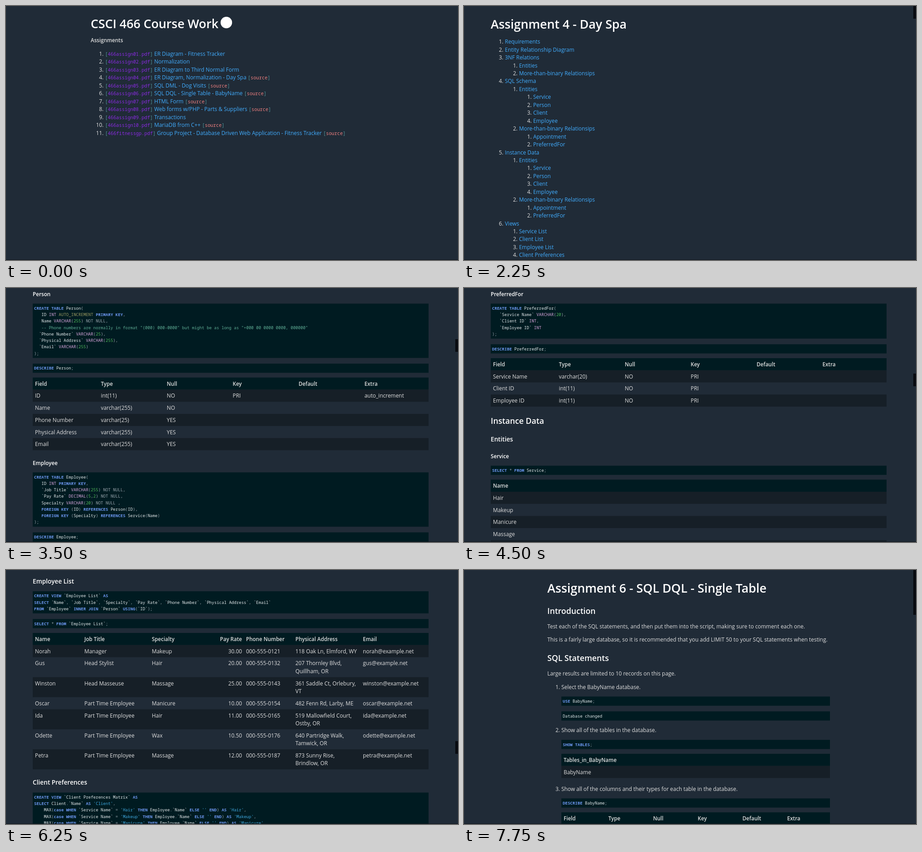
Animation, 998 px wide and 561 px high, one loop 8000 ms. Source, as an HTML page:

```html
<!DOCTYPE html>
<html lang="en">
<head>
<meta charset="utf-8">
<title>Course work</title>
<style>
html, body { margin: 0; width: 100%; height: 100%; overflow: hidden; background: #202b37; }
svg { display: block; width: 100vw; height: 100vh; }
text { font: 11.9px "Open Sans", "Noto Sans", sans-serif; fill: #dfdfdf; white-space: pre; }
.h1, .h2, .h3, .h4 { font-weight: 600; fill: #fff; }
.h1 { font-size: 26.8px; }
.h2 { font-size: 17.7px; }
.h3 { font-size: 13.7px; }
.h4 { font-size: 11.7px; }
.b { font-weight: 600; font-size: 11.6px; }
.a { fill: #41adff; }
.mono { font: 500 10.37px "Noto Sans Mono", monospace; fill: #4f9499; }
.pdf { fill: #8a2be2; }
.src { fill: #f08080; }
.code { font: 500 9.09px "Noto Sans Mono", monospace; fill: #e4e8ea; }
.com { fill: #5fae96; }
.str { fill: #3fa9e0; }
.kw { fill: #6c96ee; font-weight: 600; }
.type { fill: #d9a5dc; }
.auto { fill: #9b9a62; }
.num { fill: #4fb85a; }
.op { fill: #9aa5ad; }
.ink { font-family: Lato, sans-serif; text-anchor: middle; }
</style>
</head>
<body>
<svg id="stage" viewBox="0 0 998 561"></svg>
<script>
const PURPLE = '#5a2a91', BLUE = '#0e6dbd', DARK = '#001b21', ROW = '#161f27';
const LEFT = 59, RIGHT = 933, LINE = 17.45, ROW_H = 26.75, CODE_H = 14.25;
const SIZE = { h1: 26.8, h2: 17.7, h3: 13.7, h4: 11.7, code: 9.09 };

let out = '', y = 0, afterHead = false, marks = [];

// Text is placed by the middle of its capitals.
const text = (x, cy, s, cls = '', anchor = 'start') =>
  out += `<text x="${x}" y="${cy + 0.357 * (SIZE[cls] || 11.9)}" class="${cls}" text-anchor="${anchor}">${s}</text>`;
const rect = (x, top, w, h, fill) =>
  out += `<rect x="${x}" y="${top}" width="${w}" height="${h}" fill="${fill}"/>`;
const span = (cls, s) => `<tspan class="${cls}">${s}</tspan>`;

function page(draw) {
  out = '';
  draw();
  return out;
}

// ---- flowing parts: each one moves the cursor y ----
const HEADS = { h2: [32, 24, 25], h3: [29.3, 22, 25], h4: [28.5, 20.5, 14] };

function head(cls, s) {
  const [before, after, top] = HEADS[cls];
  y += afterHead ? 16 : before;
  text(LEFT, y, s, cls);
  marks.push(y - top);
  y += after;
  afterHead = true;
}

const TOKENS = /(--.*)|(`[^`]*`)|('[^']*')|\b(CREATE|TABLES?|VIEW|PRIMARY|FOREIGN|KEY|REFERENCES|DESCRIBE|SELECT|FROM|INNER|JOIN|USING|USE|SHOW|AS|GROUP BY|case|WHEN|THEN|ELSE|END)\b|\b(INT|VARCHAR|DECIMAL|DATETIME)\b|(AUTO_INCREMENT)|\b(\d+)\b|(NOT NULL|[*=(),;.])/g;
const KINDS = ['com', '', 'str', 'kw', 'type', 'auto', 'num', 'op'];
const paint = s => s.replace(TOKENS, (m, ...g) => span(KINDS[g.findIndex(v => v !== undefined)], m));

function code(src, x0 = LEFT, x1 = RIGHT) {
  const lines = src.split('\n'), h = lines.length * CODE_H + 6;
  rect(x0, y, x1 - x0, h, DARK);
  lines.forEach((s, i) => text(x0 + 3, y + 10.1 + i * CODE_H, paint(s), 'code'));
  y += h + 12.5;
  afterHead = false;
}

// A negative column is the right edge of right-aligned cells; "|" breaks a line.
function table(cols, rows, x0 = LEFT, x1 = RIGHT) {
  y -= 2;
  rows.forEach((row, i) => {
    const cells = row.map(c => String(c).split('|'));
    const h = ROW_H + LINE * (Math.max(...cells.map(c => c.length)) - 1);
    if (!i || i % 2) rect(x0, y, x1 - x0, h, i ? ROW : DARK);
    cells.forEach((c, k) => c.forEach((s, n) =>
      text(Math.abs(cols[k]), y + 13.7 + n * LINE, s, i ? '' : 'b', cols[k] < 0 ? 'end' : 'start')));
    y += h;
  });
  afterHead = false;
}

const DESC = ['Field', 'Type', 'Null', 'Key', 'Default', 'Extra'];
const descCols = (x, step) => DESC.map((_, i) => x + i * step);

function schema(name, body, rows) {
  head('h4', name);
  code(`CREATE TABLE ${name}(\n${body}\n);`);
  code(`DESCRIBE ${name};`);
  table(descCols(64, 145.5), [DESC, ...rows]);
}

function data(name, cols, rows) {
  head('h4', name);
  code(`SELECT * FROM ${name};`);
  table(cols, rows);
}

function view(name, body, cols, rows) {
  head('h3', name);
  code(`CREATE VIEW \`${name}\` AS\n${body}`);
  code(`SELECT * FROM \`${name}\`;`);
  table(cols, rows);
}

// Nested contents; leading spaces give the depth.
function contents(src, top) {
  const count = [];
  src.split('\n').forEach((s, i) => {
    const depth = s.search(/\S/), x = 90.3 + depth * 31.2, cy = top + i * LINE;
    count.length = depth + 1;
    count[depth] = (count[depth] || 0) + 1;
    text(x - 3.3, cy, count[depth] + '.', '', 'end');
    text(x, cy, s.trim(), 'a');
  });
}

// ---- index ----
const index = page(() => {
  text(187, 39.5, 'CSCI 466 Course Work', 'h1');
  out += '<circle cx="486.5" cy="36.5" r="12.7" fill="#fff"/>';
  text(187, 76, 'Assignments', 'b');
  ['ER Diagram - Fitness Tracker', 'Normalization', 'ER Diagram to Third Normal Form',
    'ER Diagram, Normalization - Day Spa*', 'SQL DML - Dog Visits*', 'SQL DQL - Single Table - BabyName*',
    'HTML Form*', 'Web forms w/PHP - Parts &amp; Suppliers*', 'Transactions', 'MariaDB from C++*',
    'Group Project - Database Driven Web Application - Fitness Tracker*'].forEach((s, i) => {
    const cy = 105.7 + i * 17.5, n = i + 1;
    const link = (cls, t) => span('mono', '[') + span('mono ' + cls, t) + span('mono', ']');
    const file = n > 10 ? '466fitnessgp.pdf' : `466assign${String(n).padStart(2, 0)}.pdf`;
    text(215.5, cy, n + '.', '', 'end');
    text(218.5, cy, link('pdf', file) + ' ' + span('a', s.replace('*', '')) +
      (s.endsWith('*') ? ' ' + link('src', 'source') : ''));
  });
});

// ---- entity relationship diagram ----
function diagram() {
  const ink = (x, cy, s, size, fill = '#000') =>
    out += `<text class="ink" x="${x}" y="${cy + size * 0.33}" style="font-size:${size}px;fill:${fill}">${s}</text>`;
  const lines = (d, stroke, w) => out += `<path d="${d}" fill="none" stroke="${stroke}" stroke-width="${w}"/>`;
  const label = (x, cy, s, size, fill) => {
    const rows = s.split('|');
    rows.forEach((r, i) => ink(x, cy + (i - (rows.length - 1) / 2) * size * 1.28, r, size, fill));
  };
  rect(59, 138, 874, 407, '#677786');
  ink(183, 165, 'Fitness Tracker', 37.5);
  ink(100, 188, 'Revision 2', 15, '#525f6c');
  lines('M178 243L214 258M358 215L371 252M457 210L454 252M530 222L492 252M530 272L496 277M697 193L715 215' +
    'M758 184L760 215M829 192L816 215M692 309H718M834 344L823 366M300 384L271 390M279 430L266 412' +
    'M466 414L488 401M102 428V455M753 419L751 508M738 450H768M738 489H768', PURPLE, 4);
  lines('M808 168L824 172', PURPLE, 2);
  lines('M134 284H178M284 284H336M387 302L257 381M453 302L503 376M571 391H650M521 414V450M235 426L236 478' +
    'M146 399H181M762 247L759 275M758 341V366', BLUE, 3.5);

  [[63, 263, 71, 43, 'Date', 28], [335, 252, 160, 49, 'User Account', 21.5], [708, 215, 110, 31, 'Nutrients', 22],
    [650, 366, 224, 53, 'Foods &amp; Beverages', 22.5], [64, 376, 82, 51, 'Workout|Types', 16.5],
    [201, 478, 72, 43, 'Date', 28], [485, 450, 72, 43, 'Date', 28]].forEach(([x, t, w, h, s, size]) => {
    out += `<rect x="${x}" y="${t}" width="${w}" height="${h}" fill="#fff" stroke="#000" stroke-width="3.3"/>`;
    label(x + w / 2, t + h / 2, s, size);
  });
  [[230, 284, 53, 39, 'records|weight', 16.5], [759, 308, 43, 34, 'contain|nutrients', 11.2],
    [235, 398, 55, 28, 'Does|Workout', 12.3], [521, 391, 50, 25, 'Eats', 24]].forEach(([x, c, w, h, s, size]) => {
    out += `<path d="M${x - w} ${c}l${w} ${-h} ${w} ${h} ${-w} ${h}z" fill="#fff" stroke="${BLUE}" stroke-width="3"/>`;
    label(x, c, s, size, BLUE);
  });
  [[154, 224, 47, 20, 'weight', 22], [357, 190, 56, 25, 'username', 22], [471, 187, 56, 25, 'password', 21.5],
    [590, 212, 65, 29, 'first name', 22.5], [590, 272, 62, 27, 'last name', 21.5], [672, 181, 30, 16, 'Name', 15],
    [758, 161, 53, 22, 'RDV Amount', 16], [862, 180, 41, 21, 'RDV Units', 14.5], [667, 309, 26, 13, 'amount', 11],
    [848, 327, 31, 17, 'name', 16], [344, 382, 43, 23, 'intensity', 16], [313, 440, 39, 21, 'duration', 15.5],
    [422, 426, 46, 34, 'how many|servings', 14.5], [104, 475, 41, 20, 'description', 13],
    [661, 450, 77, 18, 'Serving size (units)', 13], [846, 448, 79, 18, 'Serving size mass (g)', 13],
    [662, 489, 76, 17, 'Serving size label', 13], [849, 490, 83, 18, 'Serving size volume (cc)', 12.8],
    [753, 524, 75, 17, 'calories per serving', 12.6]].forEach(([x, c, w, h, s, size]) => {
    out += `<ellipse cx="${x}" cy="${c}" rx="${w - 1}" ry="${h - 1}" fill="#fff" stroke="${PURPLE}" stroke-width="4"/>`;
    label(x, c, s, size, PURPLE);
  });
  lines('M320 204H399M651 189H693M829 333H868M69 483H138', PURPLE, 2);
  [['1', 310, 299], ['1', 388, 315], ['1', 483, 315], ['1', 165, 411], ['N', 632, 401], ['N', 782, 258],
    ['M', 154, 297], ['M', 782, 354], ['M', 538, 442], ['M', 255, 470]].forEach(([n, x, c]) => ink(x, c, `(1,${n})`, 15));
}

const fitness = page(() => {
  text(LEFT, -170, 'Assignment 1 - Fitness Tracker', 'h1');
  contents('Requirements\nEntity Relationship Diagram', -131);
  text(LEFT, -83, 'Requirements', 'h2');
  ['*Record the weight of the user by date.', '*Record workouts with their duration and intensity.',
    '*Track the foods and beverages the user eats, and compare', 'their consumption with the recommended amount.',
    '*Allow the user to search through the food database to find common foods, in order to plan their diets. These same foods will be used to track their',
    'eating.',
    "*The user will search through a list of workouts to find the one closest to the one they're going to do, in order to track the activity.",
    '*A line graph of user weight over time.'].forEach((s, i) => {
    const cy = 72 - (7 - i) * LINE;
    if (s[0] === '*') out += `<circle cx="82" cy="${cy + 1}" r="2.3" fill="#dbdbdb"/>`;
    text(90.3, cy, s.replace('*', ''));
  });
  text(LEFT, 114, 'Entity Relationship Diagram', 'h2');
  diagram();
});

// ---- plain relation pages ----
const relations = (title, list) => page(() => {
  text(LEFT, 40, title, 'h1');
  text(LEFT, 90, 'Relations', 'h2');
  list.forEach((s, i) => text(LEFT, 124.5 + i * 29.5, s));
});
const normal = relations('Assignment 2 - Normalization',
  ['First Normal Form', 'Second Normal Form', 'Third Normal Form']);
const third = relations('Assignment 3 - ER Diagram to Third Normal Form',
  ['User Account(username, password, first name, last name)', 'Nutrients(Name, RDV Amount, RDV Units)',
    'Records Weight(username, Date, weight)', 'Does Workout(username, Date, description, intensity, duration)',
    'Eats(username, Date, name, how many servings)', 'Contain Nutrients(name, Name, amount)']);

// ---- day spa ----
const STAFF = [['Manager', 'Makeup', '30.00'], ['Head Stylist', 'Hair', '20.00'], ['Head Masseuse', 'Massage', '25.00'],
  ['Part Time Employee', 'Manicure', '10.00'], ['Part Time Employee', 'Hair', '11.00'],
  ['Part Time Employee', 'Wax', '10.50'], ['Part Time Employee', 'Massage', '12.00']];
const PEOPLE = [['Norah', '118 Oak Ln, Elmford, WY'], ['Gus', '207 Thornley Blvd,|Quillham, OR'],
  ['Winston', '361 Saddle Ct, Orlebury,|VT'], ['Oscar', '482 Fenn Rd, Larby, ME'],
  ['Ida', '519 Mallowfield Court,|Ostby, OR'], ['Odette', '640 Partridge Walk,|Tamwick, OR'],
  ['Petra', '873 Sunny Rise,|Brindlow, OR']];
const SERVICES = ['Hair', 'Makeup', 'Manicure', 'Massage', 'Wax'];

const spa = page(() => {
  text(LEFT, 40, 'Assignment 4 - Day Spa', 'h1');
  const parts = ' Entities\n  Service\n  Person\n  Client\n  Employee\n More-than-binary Relationsips\n  Appointment\n  PreferredFor\n';
  contents('Requirements\nEntity Relationship Diagram\n3NF Relations\n Entities\n More-than-binary Relationsips\n' +
    `SQL Schema\n${parts}Instance Data\n${parts}Views\n Service List\n Client List\n Employee List\n Client Preferences`, 79);
  y = 570;
  head('h2', '3NF Relations');
  head('h3', 'Entities');
  code('Service(Name)\nPerson(ID, Name, Phone Number, Physical Address, Email)\nClient(ID)\nEmployee(ID, Job Title, Pay Rate, Specialty)');
  head('h3', 'More-than-binary Relationships');
  code('Appointment(Service Name, Client ID, Employee ID, Date)\nPreferredFor(Service Name, Client ID, Employee ID)');

  head('h2', 'SQL Schema');
  head('h3', 'Entities');
  schema('Service', '   Name VARCHAR(20) PRIMARY KEY', [['Name', 'varchar(20)', 'NO', 'PRI']]);
  schema('Person', `   ID INT AUTO_INCREMENT PRIMARY KEY,
   Name VARCHAR(255) NOT NULL,
   -- Phone numbers are normally in format "(000) 000-0000" but might be as long as "+000 00 0000 0000, 000000"
  \`Phone Number\` VARCHAR(25),
  \`Physical Address\` VARCHAR(255),
  \`Email\` VARCHAR(255)`,
  [['ID', 'int(11)', 'NO', 'PRI', '', 'auto_increment'], ['Name', 'varchar(255)', 'NO'],
    ['Phone Number', 'varchar(25)', 'YES'], ['Physical Address', 'varchar(255)', 'YES'], ['Email', 'varchar(255)', 'YES']]);
  schema('Employee', `   ID INT PRIMARY KEY,
   \`Job Title\` VARCHAR(255) NOT NULL,
   \`Pay Rate\` DECIMAL(5,2) NOT NULL,
   Specialty VARCHAR(20) NOT NULL ,
   FOREIGN KEY (ID) REFERENCES Person(ID),
   FOREIGN KEY (Specialty) REFERENCES Service(Name)`,
  [['ID', 'int(11)', 'NO', 'PRI'], ['Job Title', 'varchar(255)', 'NO'], ['Pay Rate', 'decimal(5,2)', 'NO'],
    ['Specialty', 'varchar(20)', 'NO', 'MUL']]);
  schema('Client', '   ID INT PRIMARY KEY,\n   FOREIGN KEY (ID) REFERENCES Person(ID)', [['ID', 'int(11)', 'NO', 'PRI']]);
  head('h3', 'More-than-binary Relationships');
  const keys = '   `Service Name` VARCHAR(20),\n   `Client ID` INT,\n   `Employee ID` INT';
  const keyRows = [['Service Name', 'varchar(20)', 'NO', 'PRI'], ['Client ID', 'int(11)', 'NO', 'PRI'], ['Employee ID', 'int(11)', 'NO', 'PRI']];
  schema('Appointment', keys + ',\n   Date DATETIME', [...keyRows, ['Date', 'datetime', 'NO', 'PRI']]);
  schema('PreferredFor', keys, keyRows);

  head('h2', 'Instance Data');
  head('h3', 'Entities');
  data('Service', [64], [['Name'], ...SERVICES.map(s => [s])]);
  data('Client', [-89], [['ID'], [7], [8], [9]]);
  data('Employee', [-89, 98, 488, -928], [['ID', 'Job Title', 'Specialty', 'Pay Rate'],
    ...STAFF.slice(0, 5).map((r, i) => [i + 1, ...r])]);
  head('h3', 'More-than-binary Relationships');
  const days = ['09-28', '10-06', '10-12', '10-19', '09-27'];
  data('Appointment', [64, -248, -332, 341], [['Service Name', 'Client ID', 'Employee ID', 'Date'],
    ...days.map((d, i) => ['Hair', i < 4 ? 7 : 9, i < 4 ? 1 : 2, `2020-${d} 08:00:00`])]);
  data('PreferredFor', [64, -248, -332], [['Service Name', 'Client ID', 'Employee ID'], ['Hair', 7, 1], ['Hair', 9, 2]]);

  head('h2', 'Views');
  view('Service List', 'SELECT `Name` FROM `Service`;', [64], [['Name'], ...SERVICES.map(s => [s])]);
  view('Client List', 'SELECT `ID`, `Name`\nFROM `Client` INNER JOIN `Person` USING(`ID`);', [-89, 98],
    [['ID', 'Name'], [7, PEOPLE[6][0]], [9, PEOPLE[5][0]]]);
  view('Employee List', 'SELECT `Name`, `Job Title`, `Specialty`, `Pay Rate`, `Phone Number`, `Physical Address`, `Email`\nFROM `Employee` INNER JOIN `Person` USING(`ID`);',
    [64, 173, 322, -521, 530, 639, 788],
    [['Name', 'Job Title', 'Specialty', 'Pay Rate', 'Phone Number', 'Physical Address', 'Email'],
      ...PEOPLE.map(([name, home], i) =>
        [name, ...STAFF[i], `000-555-01${21 + i * 11}`, home, name.toLowerCase() + '@example.net'])]);
  head('h3', 'Client Preferences');
  code('CREATE VIEW `Client Preferences Matrix` AS\nSELECT Client.`Name` AS \'Client\',\n' +
    SERVICES.map(s => `    MAX(case WHEN \`Service Name\` = '${s}' THEN Employee.\`Name\` ELSE '' END) AS '${s}'`).join(',\n') +
    '\nFROM `PreferredFor`\nGROUP BY Client.`Name`;');
  code('SELECT * FROM `Client Preferences Matrix`;');
});

// ---- statement pages ----
const item = (n, cy, s) => {
  text(212, cy, n + '.', '', 'end');
  text(215, cy, s);
  y = cy + 21.2;
};
const sql = s => code(s, 215, 808);

const visits = page(() => {
  text(184, 40, 'Assignment 5 - SQL DML - Dog Visits', 'h1');
  text(184, 90, 'SQL Statements', 'h2');
  item(1, 124.5, 'Show all of the tables in the database.');
  sql('SHOW TABLES;');
});

const names = page(() => {
  text(184, 40, 'Assignment 6 - SQL DQL - Single Table', 'h1');
  text(184, 90.5, 'Introduction', 'h2');
  text(184, 124.5, 'Test each of the SQL statements, and then put them into the script, making sure to comment each one.');
  text(184, 154, 'This is a fairly large database, so it is recommended that you add LIMIT 50 to your SQL statements when testing.');
  text(184, 195, 'SQL Statements', 'h2');
  text(184, 229, 'Large results are limited to 10 records on this page.');
  item(1, 258.3, 'Select the BabyName database.');
  sql('USE BabyName;');
  sql('Database changed');
  item(2, 354, 'Show all of the tables in the database.');
  sql('SHOW TABLES;');
  table([220], [['Tables_in_BabyName'], ['BabyName']], 215, 808);
  item(3, 483.3, 'Show all of the columns and their types for each table in the database.');
  sql('DESCRIBE BabyName;');
  table(descCols(220, 98.7), [DESC], 215, 808);
});

// ---- one view per quarter second: page, scroll, thumb top, thumb height ----
const spaAt = (mark, thumb) => [spa, marks[mark], thumb, 28];
const views = [
  [index, 0, 0, 0], [index, 0, 0, 0],
  [fitness, -210, 0, 253], [fitness, -105, 154, 253], [fitness, 0, 308, 253],
  [normal, 0, 0, 0], [normal, 0, 0, 0], [third, 0, 0, 0], [third, 0, 0, 0],
  [spa, 0, 0, 28],
  spaAt(0, 40), spaAt(1, 60), spaAt(3, 80), spaAt(5, 97), spaAt(6, 113),
  spaAt(7, 132), spaAt(8, 151), spaAt(10, 170), spaAt(11, 189), spaAt(14, 208), spaAt(15, 226), spaAt(16, 245),
  spaAt(18, 259), spaAt(21, 310), spaAt(22, 344), spaAt(23, 378),
  spaAt(24, 400), spaAt(24, 400),
  [visits, 0, 0, 0], [visits, 0, 0, 0], [visits, 0, 0, 0],
  [names, 0, 0, 99],
];

const stage = document.getElementById('stage');
let shown = -1;

function tick() {
  const step = Math.floor(performance.now() % 8000 / 250);
  if (step !== shown) {
    const [body, scroll, top, height] = views[shown = step];
    stage.innerHTML = `<g transform="translate(0 ${-scroll})">${body}</g>` +
      `<rect x="992" y="${top}" width="6" height="${height}" fill="#080b10"/>` +
      '<rect y="560" width="998" height="1" fill="#10161d"/>';
  }
  requestAnimationFrame(tick);
}
tick();
</script>
</body>
</html>
```
